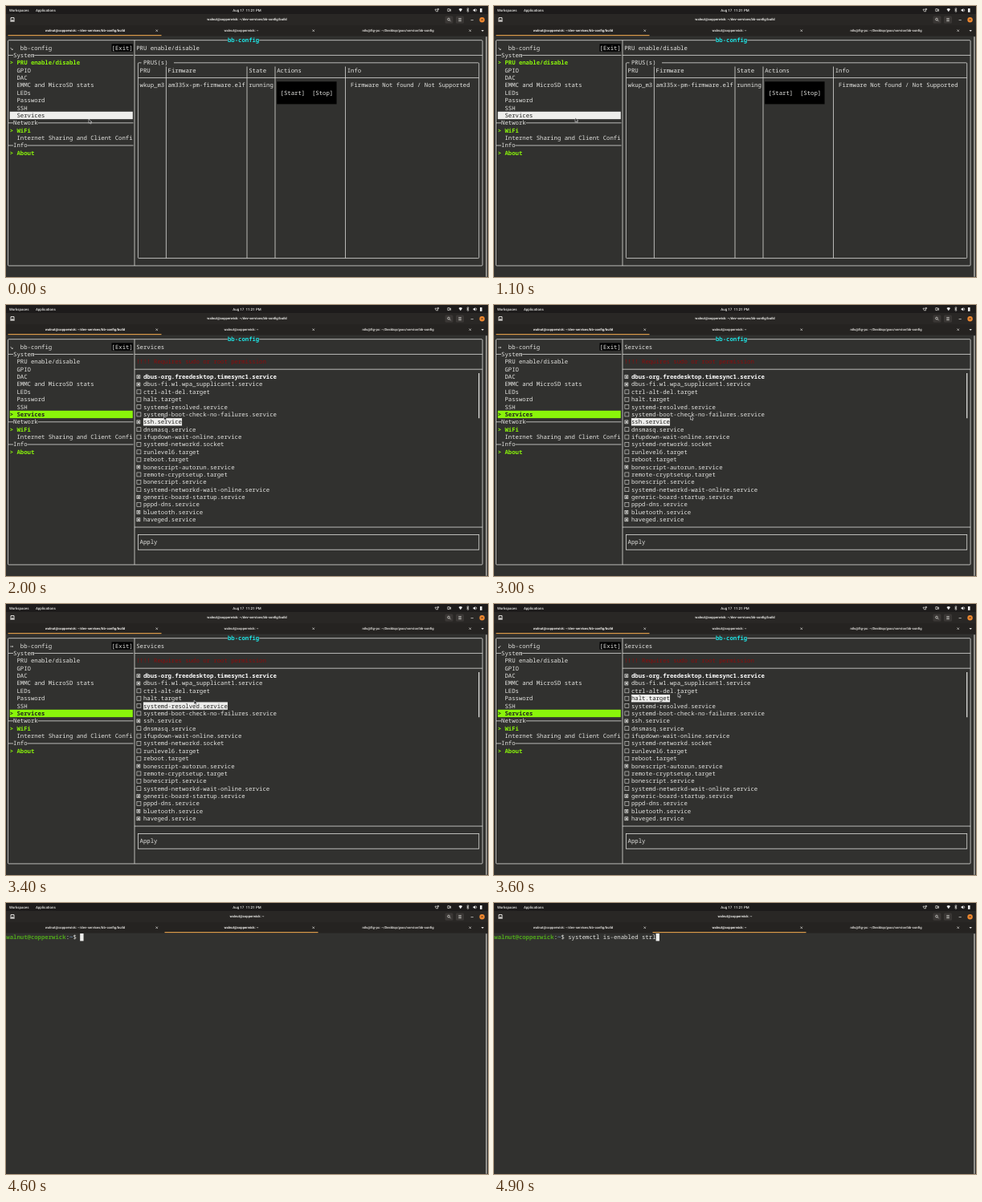
These frames come from a looping animation (600x338 px, 5 s). An HTML page:

```html
<!DOCTYPE html>
<html lang="en">
<head>
<meta charset="utf-8">
<title>Terminal session</title>
<style>
  html, body { margin: 0; width: 100%; height: 100%; overflow: hidden; background: #31312f; }
  svg { display: block; width: 100vw; height: 100vh; }
  text { white-space: pre; text-rendering: geometricPrecision; fill: #e6e6e3; }
  .mono { font: 7.292px "Noto Sans Mono", "DejaVu Sans Mono", monospace; font-variant-ligatures: none; }
  .arrow { font-family: "DejaVu Sans Mono", monospace; }
  .ui { font: 500 4.45px Roboto, "Open Sans", sans-serif; }
  .title { font-size: 4.2px; font-weight: 700; }
  .bold { font-weight: 700; }
  .line { fill: none; stroke: #dededb; stroke-width: .8; }
  .icon { fill: none; stroke: #e4e2df; stroke-width: .7; }
</style>
</head>
<body>
<svg id="stage" viewBox="0 0 600 338" preserveAspectRatio="none"></svg>
<script>
const LOOP = 5000, CELL = 4.375, ROW = 9.375, LEFT = .3, FIRST = 42.7;
const GREEN = '#8af50a', DARK = '#20201f', PALE = '#eeeeec';
const stage = document.getElementById('stage');

const colX = c => LEFT + c * CELL;
const midX = c => colX(c + .5);
const midY = r => FIRST + r * ROW;
const topY = r => midY(r) - ROW / 2;

function add(parent, tag, attrs = {}, content = '') {
  const node = document.createElementNS('http://www.w3.org/2000/svg', tag);
  for (const key in attrs) node.setAttribute(key, attrs[key]);
  node.textContent = content;
  return parent.appendChild(node);
}
const group = (parent = stage) => add(parent, 'g');
const box = (g, x, y, width, height, fill) => add(g, 'rect', { x, y, width, height, fill });
const path = (g, d, cls = 'line') => add(g, 'path', { d, class: cls });

// Text, fills and rules placed on the character grid
function put(g, col, row, str, color, bold) {
  const node = add(g, 'text', { x: colX(col), y: midY(row) + 2.5, class: bold ? 'mono bold' : 'mono' }, str);
  if (color) node.style.fill = color;
  return node;
}
const fillCells = (g, col, row, cols, rows, color) =>
  box(g, colX(col), topY(row), cols * CELL, rows * ROW, color);
const hline = (g, row, x1, x2) => path(g, `M${x1} ${midY(row)}H${x2}`);
const vline = (g, col, y1, y2) => path(g, `M${midX(col)} ${y1}V${y2}`);

// Rounded frame whose top edge leaves a gap for a heading
function frame(g, col1, row1, col2, row2, gapStart, gapEnd) {
  const l = midX(col1), r = midX(col2), t = midY(row1), b = midY(row2);
  path(g, `M${gapStart} ${t}H${l + 1}q-1 0-1 1V${b - 1}q0 1 1 1H${r - 1}q1 0 1-1V${t + 1}q0-1-1-1H${gapEnd}`);
}

function label(x, y, str, cls = '', anchor = 'middle') {
  return add(stage, 'text', { x, y, class: 'ui ' + cls, 'text-anchor': anchor }, str);
}

// Desktop bar, window header and tabs
const HOST = 'walnut@copperwick: ~';
const BUILD = HOST + '/dev-services/bb-config/build';
box(stage, 0, 0, 600, 338, '#31312f');
box(stage, 0, 0, 600, 10, '#1d1b1b');
box(stage, 0, 10, 600, 14, '#292725');
box(stage, 0, 24, 600, 13.5, '#252321');
label(4, 6.6, 'Workspaces', '', 'start');
label(37, 6.6, 'Applications', '', 'start');
label(300, 6.6, 'Aug 17  11:21 PM');
const title = label(300, 18.4, BUILD, 'title');
const tabs = [[98.5, BUILD], [293, HOST], [488, 'nils@fig-pc: ~/Desktop/gsoc/service/bb-config']]
  .map(([x, str]) => label(x, 32, str, 'title'));
[187.7, 382.7, 577.7].forEach(x => path(stage, `M${x - 1.2} 29.5l2.4 2.4m0-2.4l-2.4 2.4`, 'icon'));
const underline = box(stage, 2.5, 36, 191, 1.2, '#d99a4a');
add(stage, 'path', { d: 'M591.5 30h3.4l-1.7 2z', fill: '#e4e2df' });

// Tray and header icons
path(stage, 'M534 4.2h3.5v2.6h-2z M537 3.4h1.6v1.6', 'icon');
path(stage, 'M549.8 3.6h2.4v3h-2.4z M552.2 5l1.4-1v2.4z', 'icon');
add(stage, 'path', { d: 'M563.5 4q2.3-1.8 4.6 0l-2.3 3.3z', fill: '#eee' });
path(stage, 'M573.4 3.8l2.8 2.5-1.4 1.2v-5l1.4 1.2-2.8 2.5', 'icon');
add(stage, 'path', { d: 'M581.6 4.2h1.2l1.5-1.3v4.6l-1.5-1.3h-1.2z', fill: '#eee' });
path(stage, 'M585.3 3.8q1 1.4 0 2.8', 'icon');
box(stage, 590, 3, 2.6, 4.8, '#eee');
path(stage, 'M6 14.6h4v4H6zM8 16.8v2M5.2 19h5.6', 'icon').style.strokeWidth = 1;
[[546.5, 10], [560, 10]].forEach(([x, w]) =>
  add(stage, 'rect', { x, y: 12.6, width: w, height: 9.2, rx: 1.5, fill: '#3a3735' }));
add(stage, 'circle', { cx: 551, cy: 16.6, r: 1.4, class: 'icon' });
path(stage, 'M552.1 17.7l1.5 1.5', 'icon');
path(stage, 'M563.3 15.6h3.5m-3.5 1.6h3.5m-3.5 1.6h3.5', 'icon');
path(stage, 'M578.6 17.6h3.2', 'icon');
add(stage, 'circle', { cx: 592.6, cy: 17.2, r: 3.2, fill: '#f28a30' });
path(stage, 'M591.5 16.1l2.2 2.2m0-2.2l-2.2 2.2', 'icon').style.stroke = '#3a2a1c';
add(stage, 'rect', { x: 597, y: 38, width: 2, height: 300, rx: 1, fill: '#92908c' });

// Text interface frame
const app = group();
frame(app, 0, 0, 135, 30, colX(63), colX(72));
vline(app, 36, midY(0), midY(30));
put(app, 63, 0, 'bb-config', '#1fe3e3', true);
put(app, 4, 1, 'bb-config');
fillCells(app, 30, 1, 6, 1, '#000');
put(app, 30, 1, '[Exit]');
[['System', 2], ['Network', 11], ['Info', 14]].forEach(([name, row]) => {
  hline(app, row, 3, colX(2));
  put(app, 2, row, name);
  hline(app, row, colX(2 + name.length), 158.5);
});
['GPIO', 'DAC', 'EMMC and MicroSD stats', 'LEDs', 'Password', 'SSH']
  .forEach((name, i) => put(app, 3, 4 + i, name));
put(app, 3, 13, 'Internet Sharing and Client Confi');
put(app, 1, 12, '> WiFi', GREEN, true);
put(app, 1, 15, '> About', GREEN, true);
hline(app, 2, midX(36), midX(135));
const spinner = put(app, 1, 1, '');
spinner.classList.add('arrow');

// First page: processor units
const units = group(app);
put(units, 1, 3, '> PRU enable/disable', GREEN, true);
fillCells(units, 1, 10, 35, 1, PALE);
put(units, 3, 10, 'Services', DARK);
put(units, 37, 1, 'PRU enable/disable');
frame(units, 37, 3, 134, 29, 168.5, 209);
put(units, 39, 3, 'PRUS(s)');
hline(units, 5, midX(37), midX(134));
[45, 68, 76, 96].forEach(c => vline(units, c, topY(4), midY(29)));
[[38, 'PRU'], [46, 'Firmware'], [69, 'State'], [77, 'Actions'], [97, 'Info']]
  .forEach(([c, str]) => put(units, c, 4, str));
[[38, 'wkup_m3'], [46, 'am335x-pm-firmware.elf'], [69, 'running'], [98, 'Firmware Not found / Not Supported']]
  .forEach(([c, str]) => put(units, c, 6, str));
fillCells(units, 77, 6, 17, 3, '#000');
put(units, 78, 7, '[Start]');
put(units, 87, 7, '[Stop]');

// Second page: services, '+' marks an enabled one
const SERVICES = `+dbus-org.freedesktop.timesync1.service
+dbus-fi.w1.wpa_supplicant1.service
 ctrl-alt-del.target
 halt.target
 systemd-resolved.service
 systemd-boot-check-no-failures.service
+ssh.service
 dnsmasq.service
 ifupdown-wait-online.service
 systemd-networkd.socket
 runlevel6.target
 reboot.target
+bonescript-autorun.service
 remote-cryptsetup.target
 bonescript.service
 systemd-networkd-wait-online.service
+generic-board-startup.service
 pppd-dns.service
+bluetooth.service
+haveged.service`.split('\n');
const services = group(app);
put(services, 3, 3, 'PRU enable/disable');
fillCells(services, 1, 10, 35, 1, GREEN);
put(services, 1, 10, '> Services', DARK, true);
put(services, 37, 1, 'Services');
put(services, 37, 3, '!!!! Requires sudo or root permission', '#8e0b0b');
[4, 25].forEach(r => hline(services, r, midX(36), midX(135)));
SERVICES.forEach((entry, i) => {
  const y = midY(5 + i);
  if (entry[0] === '+') {
    add(services, 'rect', { x: 162.9, y: y - 1.9, width: 3.9, height: 3.9, class: 'line' });
    box(services, 163.9, y - .9, 1.9, 1.9, '#e6e6e3');
  } else {
    add(services, 'rect', { x: 162.9, y: y - 2.5, width: 5, height: 5, class: 'line' }).style.strokeWidth = .6;
  }
  put(services, 39, 5 + i, entry.slice(1), i ? '' : '#fff', i === 0);
});
vline(services, 134, topY(5), topY(11)).style.strokeWidth = 1.3;
add(services, 'rect', {
  x: midX(37), y: midY(26), width: 97 * CELL, height: 2 * ROW, class: 'line'
});
put(services, 38, 27, 'Apply');
const hoverBar = fillCells(services, 39, 0, 0, 1, PALE);
const hoverText = put(services, 39, 0, '', DARK);

const pointer = add(app, 'path', {
  d: 'M0 0V5.2L1.3 4.1 2.2 6 3.1 5.6 2.3 3.7H3.9Z', fill: '#1a1a1a', stroke: '#f0f0f0', 'stroke-width': .55
});

// Shell tab
const shell = group();
put(shell, 0, 0, 'walnut@copperwick', '#4fa51c', true);
put(shell, 17, 0, ':');
put(shell, 18, 0, '~', '#7d9fc4', true);
put(shell, 19, 0, '$');
const typed = put(shell, 21, 0, '');
const caret = fillCells(shell, 21, 0, 1, 1, PALE);

// Tables of [start ms, value...]
const ARROWS = '←↖↑↗→↘↓↙';
const SPIN = [[0, 5], [100, 6], [600, 7], [700, 0], [800, 1], [900, 2], [1000, 3], [1100, 5], [1200, 7],
  [1300, 0], [1400, 1], [1700, 2], [1800, 3], [1900, 4], [2000, 5], [2100, 6], [2200, 7], [2400, 1],
  [2500, 2], [3000, 4], [3100, 6], [3200, 0], [3300, 2], [3400, 4], [3500, 6], [3600, 7], [3700, 1],
  [3800, 3], [4200, 6], [4300, 1]];
const HOVER = [[0, -1], [2000, 6], [3200, 5], [3400, 4], [3600, 3], [4200, 2]];
const TYPED = [[0, ''], [4800, 'systemctl is-enabled '], [4900, 'systemctl is-enabled strl']];
const MOVES = [[0, 103, 141], [500, 103, 141], [1100, 101, 139.5], [1600, 101, 139.5],
  [2200, 244.5, 138], [3000, 244.5, 138], [3600, 229, 111], [LOOP, 229, 111]];

const at = (table, t) => table.filter(step => step[0] <= t).pop()[1];
function pointerAt(t) {
  const i = MOVES.findIndex(m => m[0] > t);
  const [t0, x0, y0] = MOVES[i - 1], [t1, x1, y1] = MOVES[i];
  const k = (t - t0) / (t1 - t0);
  return [x0 + (x1 - x0) * k, y0 + (y1 - y0) * k];
}
const show = (node, on) => node.setAttribute('visibility', on ? 'inherit' : 'hidden');

let drawn = -1;
function render(now) {
  const t = Math.floor(now % LOOP / 100) * 100;
  if (t !== drawn) draw(drawn = t);
  requestAnimationFrame(() => render(performance.now()));
}

function draw(t) {
  const inShell = t >= 4600;
  show(app, !inShell);
  show(shell, inShell);
  show(units, t < 1200);
  show(services, t >= 1200);
  title.textContent = inShell ? HOST : BUILD;
  underline.setAttribute('x', inShell ? 197.5 : 2.5);
  tabs.forEach((tab, i) => tab.style.fill = i === +inShell ? '#f0eeeb' : '#d8d6d3');

  spinner.textContent = ARROWS[at(SPIN, t)];
  pointer.setAttribute('transform', `translate(${pointerAt(t)})`);

  const index = at(HOVER, t);
  const name = index < 0 ? '' : SERVICES[index].slice(1);
  hoverText.textContent = name;
  hoverText.setAttribute('y', midY(5 + index) + 2.5);
  hoverBar.setAttribute('y', topY(5 + index));
  hoverBar.setAttribute('width', name.length * CELL);

  const command = at(TYPED, t);
  typed.textContent = command;
  caret.setAttribute('x', colX(21 + command.length));
}
render(performance.now());
</script>
</body>
</html>
```
